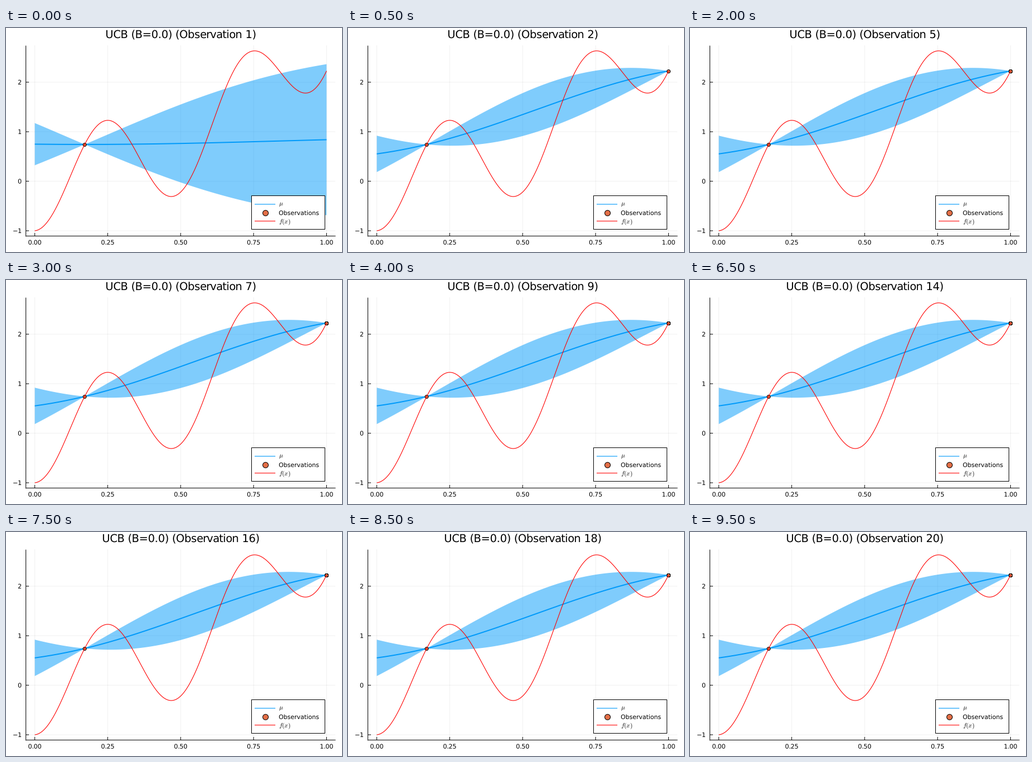
Recreate the animation shown at these times as a matplotlib script. Size 600 px wide and 400 px high, loop 10 s.

```python
import numpy as np
import matplotlib.pyplot as plt
from matplotlib.animation import FuncAnimation
from matplotlib.patches import PathPatch, Polygon, Rectangle
from matplotlib.path import Path
from matplotlib.textpath import TextPath
from matplotlib.transforms import Affine2D

W, H, DPI = 600, 400, 100
PX = 72 / DPI  # points per pixel
BLUE, ORANGE = "#009afa", "#e36f47"
SMALL, LARGE = 8 / PX, 14 / PX
OBSERVATIONS = 20

plt.rcParams["font.family"] = "DejaVu Sans"
fig = plt.figure(figsize=(W / DPI, H / DPI), dpi=DPI, facecolor="white")
ax = fig.add_axes([0, 0, 1, 1])
ax.set_xlim(0, W)
ax.set_ylim(H, 0)
ax.axis("off")


def to_x(v):
    return 51.4 + 521 * np.asarray(v)


def to_y(v):
    return 273.65 - 88.42 * np.asarray(v)


def objective(x):
    return -np.cos(13 * x) + 0.53 * x + 1.34 * x**2 + 1.265 * x**3


def posterior(x, obs, mean, scale, length=0.69):
    """Gaussian process mean and deviation given noise-free observations."""
    def kernel(a, b):
        return np.exp(-np.subtract.outer(a, b) ** 2 / (2 * length**2))

    k = kernel(x, obs)
    weights = np.linalg.solve(kernel(obs, obs), k.T).T
    mu = mean + weights @ (objective(obs) - mean)
    var = 1 - np.sum(weights * k, axis=1)
    return mu, scale * np.sqrt(np.maximum(var, 0))


def text_path(s, x, y, size, align="center", whole=True):
    """Text outline with its baseline at y; `whole` floors glyph advances."""
    def right(t):
        return TextPath((0, 0), t + "|", size=size).get_extents().x1

    advances = np.array([right(c) - right("") for c in s])
    if whole:
        advances = np.floor(advances)
    ends = np.cumsum(advances)
    x -= ends[-1] * {"left": 0, "center": 0.5, "right": 1}[align]
    glyphs = [
        TextPath((0, 0), c, size=size).transformed(
            Affine2D().scale(1, -1).translate(x + dx, y))
        for c, dx in zip(s, ends - advances) if c != " "
    ]
    return Path.make_compound_path(*glyphs)


def label(*args, **kwargs):
    patch = PathPatch(text_path(*args, **kwargs), fc="black", lw=0, zorder=8)
    return ax.add_patch(patch)


def line(xs, ys, color="black", width=1.0, **kwargs):
    return ax.plot(xs, ys, color=color, lw=width * PX,
                   solid_capstyle="butt", **kwargs)[0]


def markers(xs, ys, size, zorder):
    return ax.plot(xs, ys, "o", ms=size * PX, mfc=ORANGE, mec="black",
                   mew=PX, zorder=zorder, snap=False)[0]


# Grid, ticks and axes
LEFT, RIGHT, TOP, BOTTOM = 35, 588, 31, 371
for v in (0, 0.25, 0.5, 0.75, 1):
    px = to_x(v)
    line([px, px], [TOP, BOTTOM], alpha=0.06, zorder=1, snap=False)
    line([px, px], [BOTTOM - 5, BOTTOM], zorder=6, snap=False)
    label(f"{v:.2f}", px, 386.7, SMALL)
for v in (-1, 0, 1, 2):
    py = to_y(v)
    line([LEFT, RIGHT], [py, py], alpha=0.06, zorder=1, snap=False)
    line([LEFT, LEFT + 6], [py, py], zorder=6, snap=False)
    label(str(v).replace("-", "\u2212"), 28, py + 4, SMALL, "right")
line([LEFT, LEFT], [TOP, BOTTOM + 1], zorder=6)
line([LEFT, RIGHT], [BOTTOM, BOTTOM], zorder=6)

# Curves
grid = np.linspace(0, 1, 401)
grid_px = to_x(grid)
band = ax.add_patch(Polygon([[0, 0]], fc=BLUE, alpha=0.5, lw=0, zorder=2))
mean_line = line([], [], BLUE, 2, zorder=3)
points = markers([], [], 6, 4)
line(grid_px, to_y(objective(grid)), "red", 1.1, zorder=5)
title = label("UCB", 312, 18, LARGE)

# Legend
ax.add_patch(Rectangle((438, 299), 131, 60, fc="white", ec="black",
                       lw=PX, zorder=7))
line([444, 481], [314.7, 314.7], BLUE, 1.1, zorder=8, snap=False)
line([444, 481], [344.8, 344.8], "red", 1.1, zorder=8, snap=False)
markers([462.6], [329.7], 10, 8)
label("Observations", 487, 334, 10.9, "left", whole=False)
for s, y in ((r"$\mu$", 317), (r"$f(x)$", 348.5)):
    ax.text(487, y, s, fontsize=8, math_fontfamily="cm", va="baseline",
            zorder=8)


def update(frame):
    n = frame + 1
    obs = np.array([0.171, 1.0])[:min(n, 2)]
    mean, scale = (0.93, 1.745) if n == 1 else (1.15, 1.83)
    mu, dev = posterior(grid, obs, mean, scale)
    edge_x = np.r_[grid_px, grid_px[::-1]]
    edge_y = to_y(np.r_[mu + dev, (mu - dev)[::-1]])
    band.set_xy(np.column_stack([edge_x, edge_y]))
    mean_line.set_data(grid_px, to_y(mu))
    # every later sample lands on the right end again
    sampled = np.r_[obs[:1], np.ones(n - 1)]
    points.set_data(to_x(sampled), to_y(objective(sampled)))
    title.set_path(text_path(f"UCB (B=0.0) (Observation {n})", 312, 18,
                             LARGE))
    return band, mean_line, points, title


anim = FuncAnimation(fig, update, frames=OBSERVATIONS, interval=500,
                     init_func=lambda: update(0), repeat=True)
plt.show()
```
